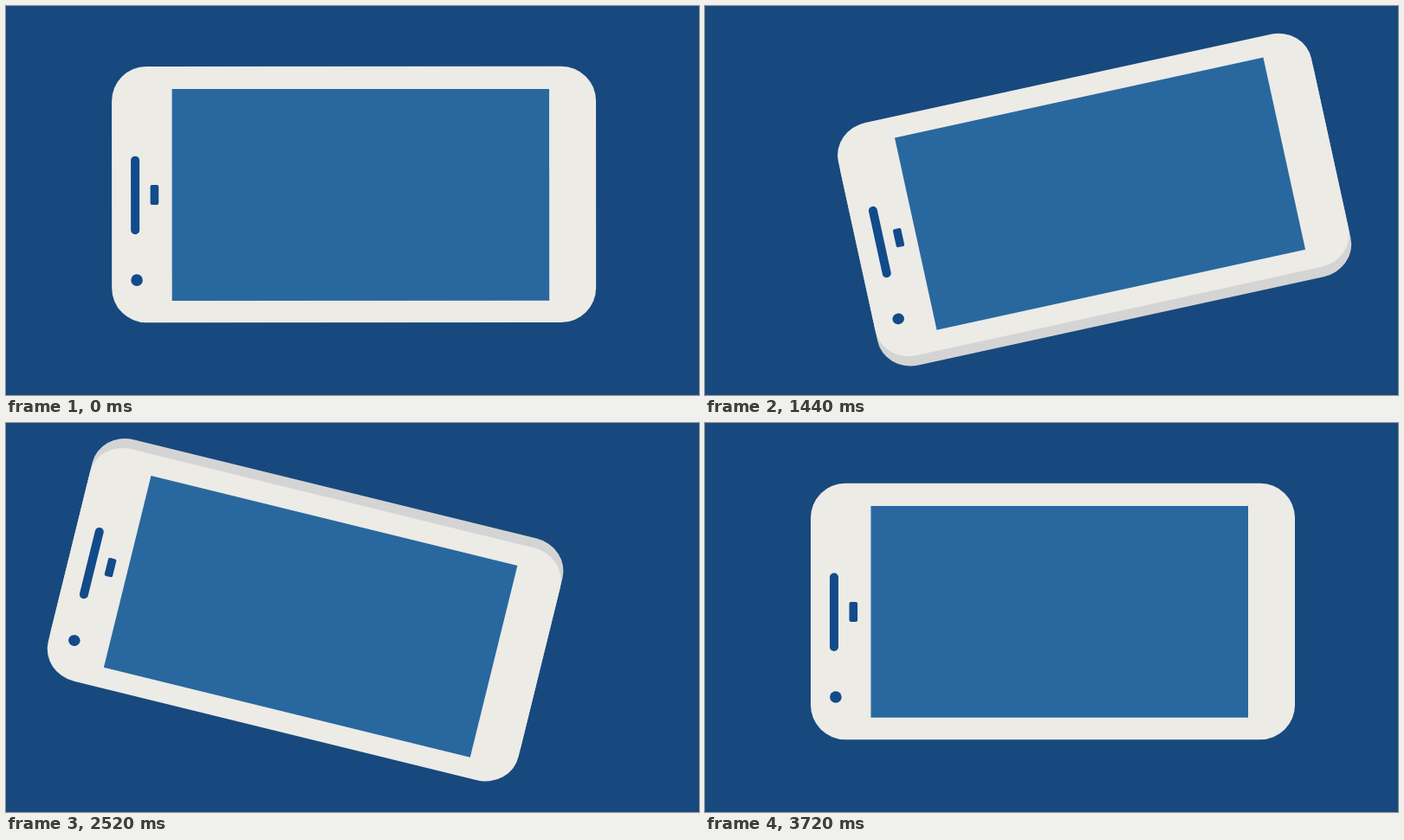
Recreate the animation shown at these times as an HTML page with a canvas. Size 800 by 450 pixels, loop 3750 ms.

```html
<!DOCTYPE html>
<html lang="en">
<head>
<meta charset="utf-8">
<title>Tilting phone</title>
<style>
  html, body { margin: 0; width: 100%; height: 100%; overflow: hidden; background: #17497e; }
  canvas { display: block; width: 800px; height: 450px; }
</style>
</head>
<body>
<canvas id="stage" width="800" height="450"></canvas>
<script>
const ctx = document.getElementById('stage').getContext('2d');
const LOOP = 3750, STEP = 30, DEPTH = 31.5;
const COLORS = { back: '#17497e', body: '#ecebe6', side: '#d5d4d4', screen: '#28689f', hole: '#124b8a' };

// Poses: turn and tilt in degrees, x is the centre of the front face
const REST = { turn: 0, tilt: 0, x: 401.5 };
const LEFT = { turn: -15, tilt: -26, x: 459 };
const RIGHT = { turn: 15, tilt: 23, x: 339.5 };
const MOVES = [
  { start: -30, end: 1130, from: REST, to: LEFT },
  { start: 1155, end: 2705, from: LEFT, to: RIGHT },
  { start: 2705, end: 3720, from: RIGHT, to: REST }
];

const rad = deg => deg * Math.PI / 180;
const smooth = k => k * k * (3 - 2 * k);

function poseAt(time) {
  const t = time >= LOOP - 30 ? time - LOOP : time;
  const move = MOVES.filter(m => t >= m.start).pop();
  const k = smooth(Math.min(1, (t - move.start) / (move.end - move.start)));
  const mix = key => move.from[key] + (move.to[key] - move.from[key]) * k;
  const tilt = mix('tilt');
  return { turn: mix('turn'), tilt, x: mix('x'), y: 218 + tilt * (tilt > 0 ? 0.175 : -0.02) };
}

function box(color, x, y, w, h, r = 0) {
  ctx.fillStyle = color;
  ctx.beginPath();
  ctx.roundRect(x, y, w, h, r);
  ctx.fill();
}

function face(pose, offset, paint) {
  ctx.save();
  ctx.translate(pose.x, pose.y);
  ctx.rotate(rad(pose.turn));
  ctx.translate(0, offset);
  ctx.scale(1, Math.cos(rad(pose.tilt)));
  paint();
  ctx.restore();
}

const body = color => box(color, -279.5, -148.2, 559, 296.4, 40);

function front() {
  body(COLORS.body);
  box(COLORS.screen, -210, -122, 435.5, 244.8);
  box(COLORS.hole, -257.5, -44.5, 10, 90.5, 5);
  box(COLORS.hole, -235, -11, 9.6, 23, 2);
  box(COLORS.hole, -257.4, 92.2, 13.6, 13.6, 6.8);
}

function draw(time) {
  const pose = poseAt(time);
  ctx.fillStyle = COLORS.back;
  ctx.fillRect(0, 0, 800, 450);
  if (Math.abs(pose.tilt) > 0.5) {
    face(pose, -DEPTH * Math.sin(rad(pose.tilt)), () => body(COLORS.side));
  }
  face(pose, 0, front);
}

const begin = performance.now();
function tick() {
  const t = (performance.now() - begin) % LOOP;
  draw(Math.floor(t / STEP) * STEP);
  requestAnimationFrame(tick);
}
tick();
</script>
</body>
</html>
```
